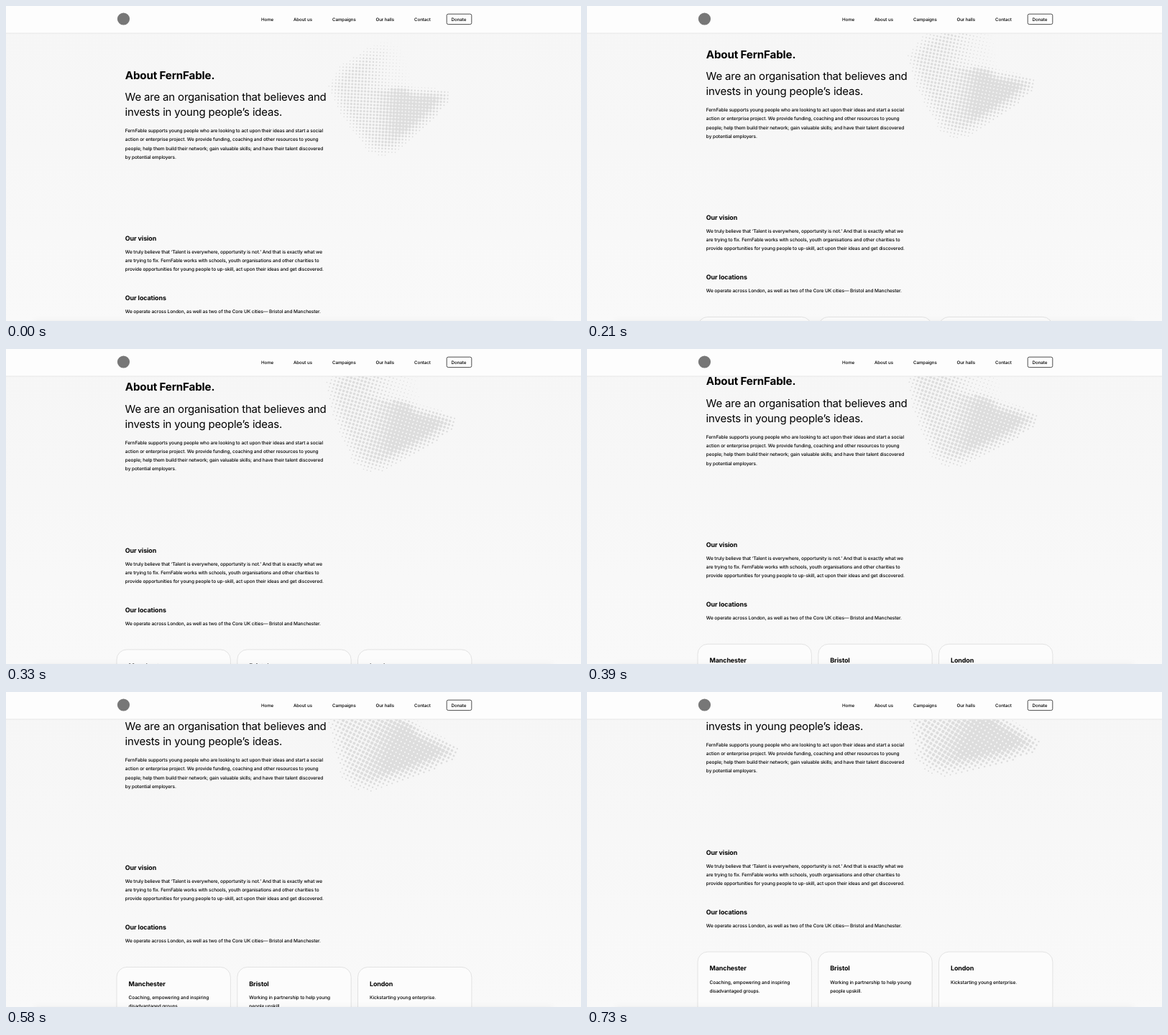
These frames come from a looping animation (800 by 439 pixels, 0.76 s). An HTML page with a canvas:

```html
<!DOCTYPE html>
<html lang="en">
<head>
<meta charset="utf-8">
<title>About FernFable</title>
<style>
  html, body { margin: 0; width: 100%; height: 100%; overflow: hidden; }
  body { background: linear-gradient(#f6f6f6, #f7f7f7 45%, #f9f9f9); }
  canvas, svg { position: absolute; left: 0; top: 0; width: 100%; height: 100%; overflow: hidden; }
  text {
    font: 500 6.54px Inter, sans-serif;
    letter-spacing: -.012em;
    text-rendering: geometricPrecision;
    font-optical-sizing: none;
  }
  .title { font-size: 15.2px; font-weight: 700; }
  .lead { font-size: 15px; font-weight: 400; }
  .sub { font-size: 8.95px; font-weight: 700; }
  .nav text { font-size: 6.2px; }
  .card { fill: #fcfcfc; stroke: #dcdcdc; stroke-width: .8; }
  .shade { fill: rgba(0, 0, 0, .06); filter: blur(5px); }
</style>
</head>
<body>
<canvas id="dots" width="800" height="439"></canvas>
<svg viewBox="0 0 800 439">
  <defs><clipPath id="stage"><rect width="800" height="439"/></clipPath></defs>
  <g clip-path="url(#stage)">
    <g id="page"></g>
    <rect class="shade" x="40" y="440" width="720" height="20"/>
  </g>
  <rect width="800" height="38" fill="#fdfdfd"/>
  <rect y="37.6" width="800" height=".8" fill="#e2e2e2"/>
  <circle cx="163.5" cy="18" r="8.6" fill="#777"/>
  <g class="nav">
    <text x="355" y="20.8">Home</text>
    <text x="400" y="20.8">About us</text>
    <text x="454" y="20.8">Campaigns</text>
    <text x="514.5" y="20.8">Our halls</text>
    <text x="568" y="20.8">Contact</text>
    <rect x="613.2" y="11.2" width="34.6" height="14.4" rx="2.2" fill="none" stroke="#222" stroke-width=".8"/>
    <text x="619.6" y="20.8">Donate</text>
  </g>
</svg>
<script>
const page = document.getElementById('page');
const ctx = document.getElementById('dots').getContext('2d');
const clamp = (x, lo = 0, hi = 1) => Math.min(hi, Math.max(lo, x));

const lines = (x, y, rows, cls = '', step = 12.2) => rows.map((row, i) =>
  `<text class="${cls}" x="${x}" y="${y + i * step}">${row}</text>`).join('');

const card = (x, name, rows) =>
  `<rect class="card" x="${x}" y="462.4" width="158.4" height="90" rx="14"/>` +
  lines(x + 16.5, 488.5, [name], 'sub') + lines(x + 16.5, 506.9, rows);

page.innerHTML =
  lines(165.8, 101.5, ['About FernFable.'], 'title') +
  lines(165.6, 132.4, ['We are an organisation that believes and', 'invests in young people’s ideas.'], 'lead', 20.7) +
  lines(165.8, 176.2, [
    'FernFable supports young people who are looking to act upon their ideas and start a social',
    'action or enterprise project. We provide funding, coaching and other resources to young',
    'people; help them build their network; gain valuable skills; and have their talent discovered',
    'by potential employers.']) +
  lines(165.8, 327, ['Our vision'], 'sub') +
  lines(165.8, 345, [
    'We truly believe that ‘Talent is everywhere, opportunity is not.’ And that is exactly what we',
    'are trying to fix. FernFable works with schools, youth organisations and other charities to',
    'provide opportunities for young people to up-skill, act upon their ideas and get discovered.']) +
  lines(165.8, 410.2, ['Our locations'], 'sub') +
  lines(165.8, 428.4, ['We operate across London, as well as two of the Core UK cities— Bristol and Manchester.']) +
  card(154, 'Manchester', ['Coaching, empowering and inspiring', 'disadvantaged groups.']) +
  card(321.8, 'Bristol', ['Working in partnership to help young', 'people upskill.']) +
  card(489.5, 'London', ['Kickstarting young enterprise.']);

// Halftone figure: dots shrink towards the outline and on the lighter facets.
const outline = [[-88, -18], [-72, -46], [-36, -70], [-6, -84], [14, -70], [26, -37], [34, -17], [56, -17],
  [79, -12], [81, 1], [62, 24], [34, 49], [6, 75], [-13, 80], [-31, 74], [-53, 46], [-75, 14]];

function edgeDistance(x, y) {
  return Math.min(...outline.map(([ax, ay], i) => {
    const [bx, by] = outline[(i + 1) % outline.length];
    const dx = bx - ax, dy = by - ay;
    const k = clamp(((x - ax) * dx + (y - ay) * dy) / (dx * dx + dy * dy));
    return Math.hypot(x - ax - k * dx, y - ay - k * dy);
  }));
}

function buildFigure() {
  const shape = new Path2D(), dots = new Path2D();
  outline.forEach(([x, y]) => shape.lineTo(x, y));
  shape.closePath();
  const step = 4.6, tilt = .05;
  for (let i = -22; i <= 22; i++) {
    for (let j = -22; j <= 22; j++) {
      const x = step * (i - j * tilt), y = step * (j + i * tilt);
      if (!ctx.isPointInPath(shape, x, y)) continue;
      const dark = clamp((x + 24) / 34) * clamp((y + 22) / 16) * clamp((80 - y) / 40, .2);
      const fade = y < -14 ? clamp(1 - (x + 40) / 65, .4) : 1;
      const edge = .4 + .6 * clamp(edgeDistance(x, y) / 16);
      const r = (1.65 * fade * (1 - dark) + 2.45 * dark) * edge;
      dots.moveTo(x + r, y);
      dots.arc(x, y, r, 0, 7);
    }
  }
  return dots;
}

const figure = buildFigure();
const scrollKeys = [[0, 0], [120, 16.5], [210, 29], [330, 43.5], [480, 62.7], [580, 79], [730, 100.3]];

function scrollAt(t) {
  const i = Math.max(1, scrollKeys.findIndex(([time]) => time >= t));
  const [t0, y0] = scrollKeys[i - 1], [t1, y1] = scrollKeys[i];
  return y0 + (y1 - y0) * (t - t0) / (t1 - t0);
}

// 30 ms steps, with one held for 40 ms at 480.
const snap = t => t < 520 ? Math.min(480, Math.floor(t / 30) * 30) : 520 + Math.floor((t - 520) / 30) * 30;

function draw() {
  const t = snap(performance.now() % 760);
  const scroll = scrollAt(t), p = t / 730;
  page.setAttribute('transform', `translate(0 ${-scroll})`);
  ctx.clearRect(0, 0, 800, 439);
  ctx.save();
  ctx.translate(536, 130 + 3 * p - scroll);
  ctx.rotate(.5 * p);
  ctx.scale(1 + .25 * p, 1 + .25 * p);
  ctx.fillStyle = '#dddddd';
  ctx.fill(figure);
  ctx.restore();
  requestAnimationFrame(draw);
}
draw();
</script>
</body>
</html>
```
